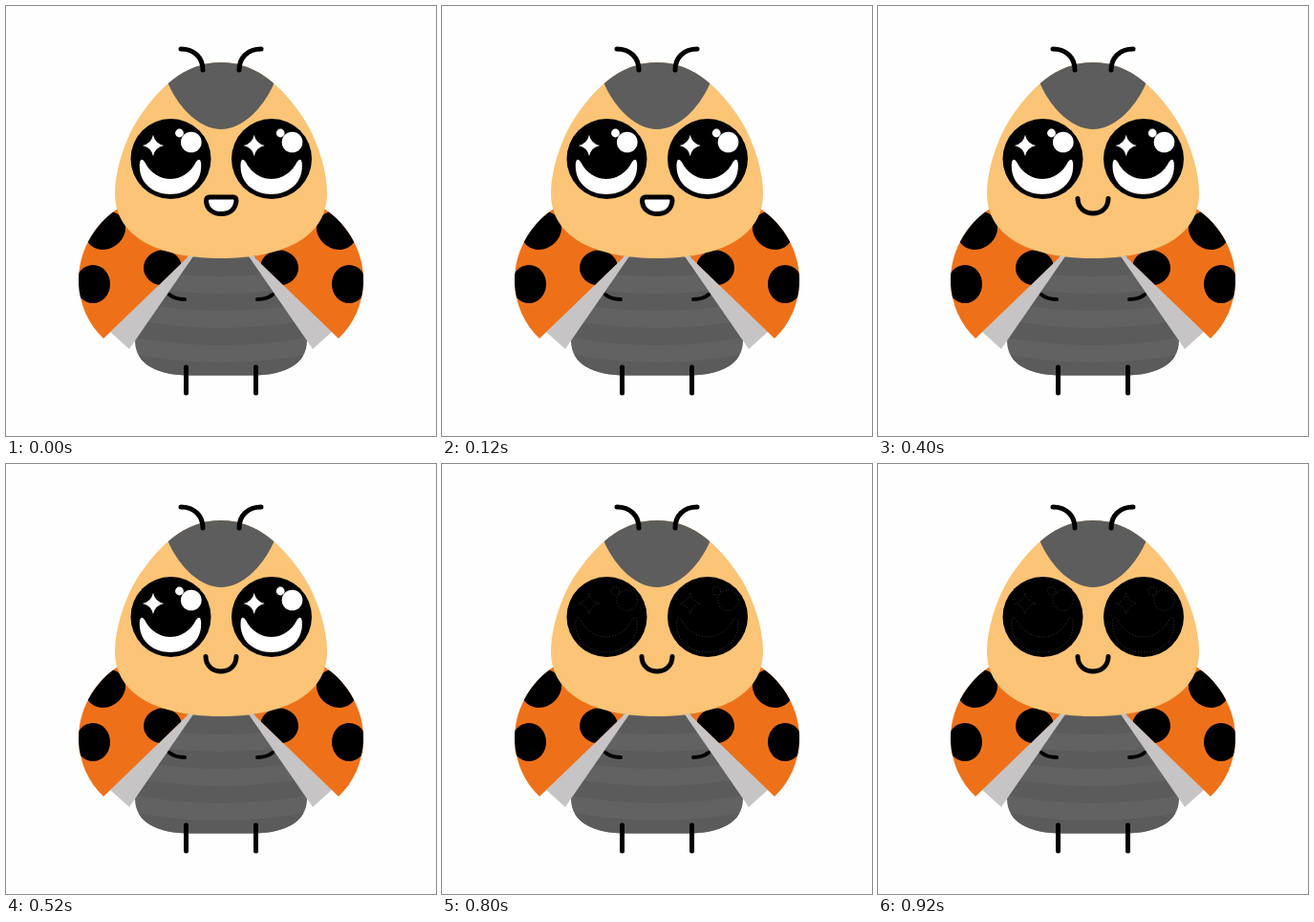
An HTML page that plays this animation: 450x450 px, repeating every 1 s.

```html
<!DOCTYPE html>
<html lang="en">
<head>
<meta charset="utf-8">
<title>Ladybug</title>
<style>
  html, body { margin: 0; width: 100%; height: 100%; overflow: hidden; background: #fefefe; }
  svg { display: block; width: 100%; height: 100%; }
  .line { fill: none; stroke: #000; stroke-width: 5; stroke-linecap: round; stroke-linejoin: round; }
  .ghost { fill: none; stroke: #4a4a4a; stroke-width: .7; stroke-dasharray: 1 2; }
</style>
</head>
<body>
<svg viewBox="0 0 450 450">
  <defs>
    <path id="bodyShape" d="M188 255C176 290 135 312 135 350C135 376 160 386 190 386.500H260C290 386 315 376 315 350C315 312 274 290 262 255Z"/>
    <path id="headShape" d="M225 59C185 59 158 88 137 120C122 145 114 175 114 196C114 245 165 264 225 264S336 245 336 196C336 175 328 145 313 120C292 88 265 59 225 59Z"/>
    <path id="wingShape" d="M120 210C90 229 75 260 76 290C77 312 86 333 102 348L190 263L150 215Z"/>
    <clipPath id="bodyClip"><use href="#bodyShape"/></clipPath>
    <clipPath id="headClip"><use href="#headShape"/></clipPath>
    <clipPath id="wingClip"><use href="#wingShape"/></clipPath>

    <g id="wing">
      <path class="flap" fill="#c6c4c5" d="M187 262L109 341L129 359L196 262Z"/>
      <use href="#wingShape" fill="#ee7119"/>
      <g clip-path="url(#wingClip)">
        <ellipse cx="104" cy="235" rx="22" ry="19" transform="rotate(-35 104 235)"/>
        <ellipse cx="91" cy="291" rx="18" ry="20"/>
        <ellipse cx="164" cy="274" rx="20" ry="18.5"/>
      </g>
    </g>

    <g id="limbs" class="line">
      <path d="M206 67C206 54 197 45 183 45"/>
      <path d="M171 302Q177 307 187 307" stroke-width="4"/>
      <path d="M188.500 378V405"/>
    </g>

    <g id="shine">
      <path d="M154 135Q156 144 165 146Q156 148 154 157Q152 148 143 146Q152 144 154 135Z"/>
      <circle cx="181.500" cy="133" r="4.400"/>
      <circle cx="193.800" cy="142.500" r="10.800"/>
      <path d="M140 164Q141 158 145 163C157 187 187 187 199 163Q203 158 204 164C206 185 190 197 172 197S138 185 140 164Z"/>
    </g>
  </defs>

  <use href="#bodyShape" fill="#626262"/>
  <g id="bands" clip-path="url(#bodyClip)" fill="none" stroke="#5b5b5b" stroke-width="18"></g>

  <g id="wings"></g>
  <use href="#headShape" fill="#fbc476"/>
  <path clip-path="url(#headClip)" fill="#5d5d5d" d="M170 82C182 109 204 129 225 129S268 109 280 82V50H170Z"/>

  <use href="#limbs"/>
  <use href="#limbs" transform="matrix(-1 0 0 1 450 0)"/>

  <circle cx="172.500" cy="160" r="42"/>
  <circle cx="278" cy="160" r="42"/>
  <g class="ghost"><use href="#shine"/><use href="#shine" x="105.700"/></g>
  <g id="bright" fill="#fff"><use href="#shine"/><use href="#shine" x="105.700"/></g>

  <path id="open" class="line" style="fill:#fff" d="M213 200H238Q241 200 241 204C240 213 234 217.500 225.500 217.500S210 213 209.500 204Q209.500 200 213 200Z"/>
  <path id="smile" class="line" d="M209 201.500C209 222 241 222 241 201.500"/>
</svg>
<script>
const $ = id => document.getElementById(id);
const NS = 'http://www.w3.org/2000/svg';

for (const y of [274, 310, 346, 382]) {
  const band = document.createElementNS(NS, 'path');
  band.setAttribute('d', `M125 ${y - 10}Q225 ${y + 10} 325 ${y - 10}`);
  $('bands').append(band);
}

// Real copies of the wing, so each flap can be animated
for (const flip of [false, true]) {
  const wing = $('wing').cloneNode(true);
  wing.removeAttribute('id');
  if (flip) wing.setAttribute('transform', 'matrix(-1 0 0 1 450 0)');
  $('wings').append(wing);
}

// One value per 200 ms step
function play(el, prop, values) {
  const keys = values.map((v, i) => ({ [prop]: v, offset: i / values.length, easing: 'step-end' }));
  keys.push({ [prop]: values[values.length - 1], offset: 1 });
  el.animate(keys, { duration: 1000, iterations: Infinity });
}

const grey = '#c6c4c5', orange = '#ee7119';
play($('bright'), 'opacity', [1, 0, 1, 1, 0]);
play($('open'), 'opacity', [1, 1, 0, 1, 0]);
play($('smile'), 'opacity', [0, 0, 1, 0, 1]);
for (const flap of $('wings').querySelectorAll('.flap'))
  play(flap, 'fill', [grey, orange, grey, orange, grey]);
</script>
</body>
</html>
```
